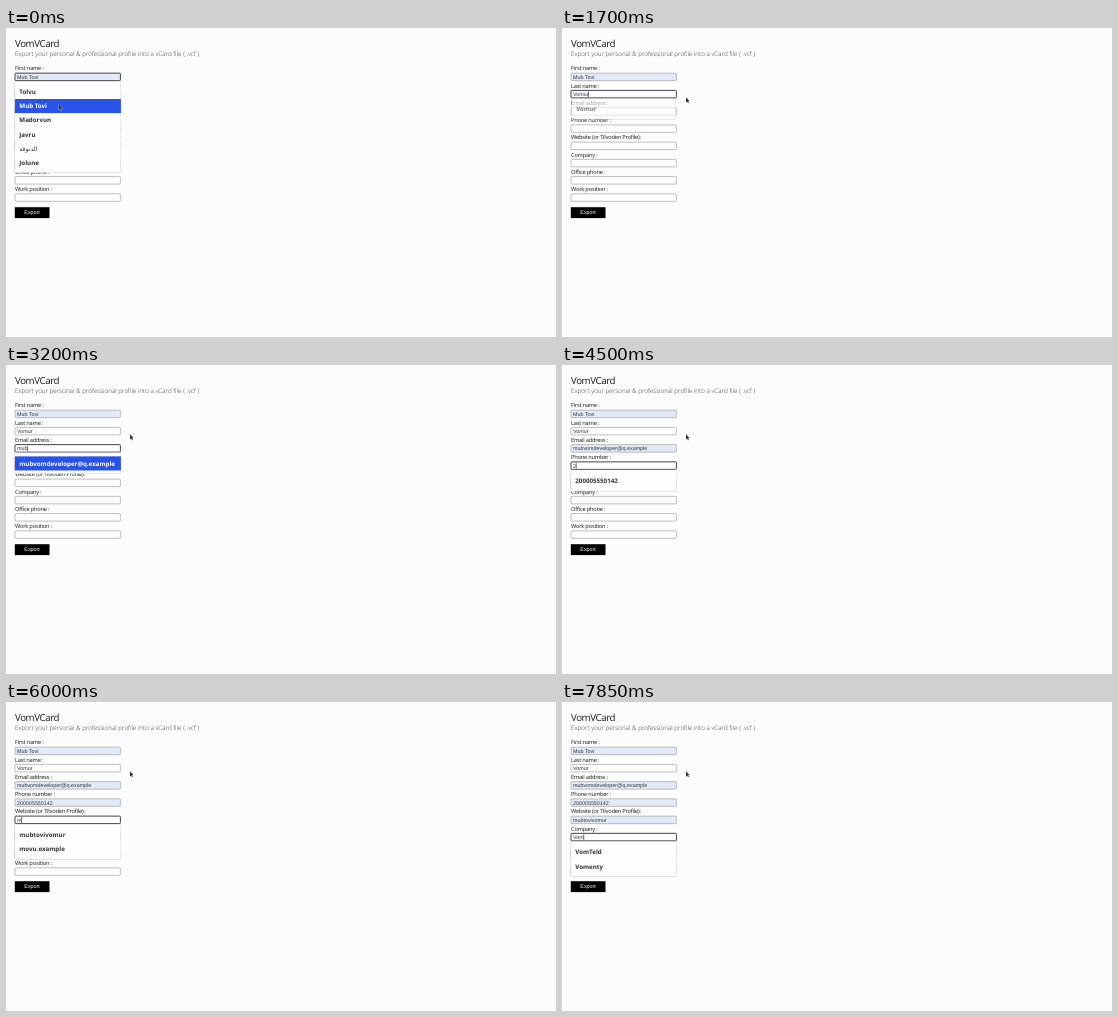
These frames come from a looping animation (550x309 px, 8 s). An HTML page:

```html
<!DOCTYPE html>
<html lang="en">
<head>
<meta charset="utf-8">
<title>Contact form</title>
<style>
  html, body { margin: 0; width: 100%; height: 100%; overflow: hidden; background: #fcfcfc; }
  svg { display: block; width: 100%; height: 100%; }
  text { white-space: pre; text-rendering: geometricPrecision; }
  .title, .label { font-family: "Open Sans", sans-serif; fill: #1a1a1a; }
  .title { font-size: 9.7px; letter-spacing: -.4px; }
  .label { font-size: 5.7px; letter-spacing: -.2px; }
  .subtitle { font: 300 6.3px "Open Sans", sans-serif; fill: #333; }
  .value, .button { font: 5.37px "Liberation Sans", Arial, sans-serif; fill: #333; }
  .button { fill: #fff; text-anchor: middle; }
  .box { fill: #fdfdfd; stroke: #959595; stroke-width: .6px; }
  .box.filled { fill: #e2eaf7; }
  .box.focus { stroke: #303038; stroke-width: .9px; }
  .menu { transform-box: fill-box; transform-origin: center; }
  .panel { fill: #fdfdfd; stroke: #d6d6d6; stroke-width: .4px; filter: drop-shadow(0 .5px .7px #0004); }
  .bar { fill: #2853e6; }
  .row { font: 600 6.2px "Noto Sans", "DejaVu Sans", sans-serif; fill: #333; }
  .row.arabic { font-weight: 400; }
  .row.active { fill: #fff; }
</style>
</head>
<body>
<svg id="stage" viewBox="0 0 550 309"></svg>
<script>
const LOOP = 8000, BLINK = 500, CLOSE = 200, ROW = 14.1;
const stage = document.getElementById('stage');
const fieldY = i => 48.9 + 17.24 * i;

const labels = ['First name :', 'Last name :', 'Email address :', 'Phone number :',
  'Website (or Tilvoden Profile):', 'Company :', 'Office phone :', 'Work position :'];
const firstNames = ['Tolvu', 'Mub Tovi', 'Madorvun', 'Javru', 'الدنوفة', 'Jolune'];
const emails = ['mubvomdeveloper@q.example', 'modavan.r@ulk-m.example', 'm.toudrelo@wi.example',
  'malorvendovett@q.example', 'Muvod.enlosta@q.example', 'modavan.r@ulko.example'];
const phone = '200005550142', site = 'mubtovivomur';

// time, focused field, value, mode (preview hides the caret)
const steps = [
  [0, 0, 'Mub Tovi', 'preview'], [100, 0, 'Mub Tovi', 'filled'],
  [700, 1, ''], [1250, 1, 'V'], [1400, 1, 'Vo'], [1500, 1, 'Vom'], [1600, 1, 'Vomu'], [1700, 1, 'Vomur'],
  [1850, 2, ''], [2050, 2, 'm'], [2200, 2, 'mu'], [2850, 2, 'mub'],
  [3250, 2, emails[0], 'preview'], [3400, 2, emails[0], 'filled'],
  [3600, 3, ''], [4500, 3, '2'], [4700, 3, '20'], [4900, 3, phone, 'preview'], [5050, 3, phone, 'filled'],
  [5500, 4, ''], [6000, 4, 'm'], [6200, 4, 'mu'], [6400, 4, site, 'preview'], [6600, 4, site, 'filled'],
  [6800, 5, ''], [7650, 5, 'V'], [7700, 5, 'Vo'], [7850, 5, 'Vom']
].map(([time, field, value, mode = '']) => ({ time, field, value, mode }));

const menus = [
  { open: 0, close: 50, field: 0, rows: firstNames, pick: 1, pickAt: 0 },
  { open: 1250, close: 1650, field: 1, rows: ['Vomur'] },
  { open: 2050, close: 2200, field: 2, rows: emails },
  { open: 2300, close: 3400, field: 2, rows: [emails[0]], pick: 0, pickAt: 3200 },
  { open: 4500, close: 5050, field: 3, rows: [phone], pick: 0, pickAt: 4850 },
  { open: 6000, close: 6200, field: 4, rows: [site, 'movu.example'] },
  { open: 6250, close: 6600, field: 4, rows: [site], pick: 0, pickAt: 6350 },
  { open: 7650, close: LOOP, field: 5, rows: ['VomTeld', 'Vomenty'] }
];

function add(parent, tag, attrs, content = '') {
  const node = document.createElementNS('http://www.w3.org/2000/svg', tag);
  for (const key in attrs) node.setAttribute(key, attrs[key]);
  node.textContent = content;
  return parent.appendChild(node);
}
const write = (parent, cls, x, y, content) => add(parent, 'text', { class: cls, x, y }, content);
const rect = (parent, cls, x, y, width, height, rx = 0) =>
  add(parent, 'rect', { class: cls, x, y, width, height, rx });

write(stage, 'title', 9, 18.5, 'VomVCard');
write(stage, 'subtitle', 9, 27.8, 'Export your personal & professional profile into a vCard file ( .vcf )');

const fields = labels.map((label, i) => {
  const y = fieldY(i);
  write(stage, 'label', 9, y - 6.5, label);
  return {
    box: rect(stage, 'box', 9, y - 3.75, 105.4, 7.5, .8),
    text: write(stage, 'value', 11, y + 2.1, '')
  };
});
const caret = rect(stage, 'caret', 0, 0, .5, 5.8);

rect(stage, '', 8.8, 179.2, 34.7, 10.9);
write(stage, 'button', 26.1, 186.4, 'Export');

for (const menu of menus) {
  const y = fieldY(menu.field);
  const rowY = i => y + 15 + ROW * i;
  menu.group = add(stage, 'g', { class: 'menu' });
  rect(menu.group, 'panel', 8.9, y + 4.4, 105.9, ROW * menu.rows.length + 6.9, .6);
  if (menu.pickAt !== undefined) menu.bar = rect(menu.group, 'bar', 8.9, rowY(menu.pick) - 7, 106, ROW);
  menu.texts = menu.rows.map((row, i) =>
    write(menu.group, /[\u0600-\u06ff]/.test(row) ? 'row arabic' : 'row', 13.3, rowY(i) + 2.3, row));
}

const pointer = add(stage, 'path', {
  d: 'M0 0V5.2L1.2 4.2 2 6 2.9 5.6 2.1 3.9H3.6Z',
  fill: '#333', stroke: '#fff', 'stroke-width': .5, 'paint-order': 'stroke'
});

function drawFields(t) {
  const past = steps.filter(step => step.time <= t);
  const now = past[past.length - 1];
  fields.forEach(({ box, text }, i) => {
    const last = past.filter(step => step.field === i).pop();
    text.textContent = last ? last.value : '';
    box.classList.toggle('filled', Boolean(last && last.mode));
    box.classList.toggle('focus', i === now.field);
  });
  const visible = now.mode !== 'preview' && Math.floor((t - now.time) / BLINK) % 2 === 0;
  const width = now.value ? fields[now.field].text.getComputedTextLength() : 0;
  caret.setAttribute('x', 10.9 + width);
  caret.setAttribute('y', fieldY(now.field) - 2.8);
  caret.setAttribute('visibility', visible ? 'visible' : 'hidden');
}

function drawMenus(t) {
  for (const menu of menus) {
    const p = Math.min(1, Math.max(0, (t - menu.close) / CLOSE));
    const shown = t >= menu.open && p < 1;
    menu.group.style.display = shown ? '' : 'none';
    menu.group.style.opacity = (1 - p) ** 1.6;
    menu.group.style.transform = `scale(${1 - .08 * p})`;
    if (!menu.bar) continue;
    const active = t >= menu.pickAt;
    menu.bar.style.display = active ? '' : 'none';
    menu.texts[menu.pick].classList.toggle('active', active);
  }
}

function drawPointer(t) {
  const p = Math.min(1, Math.max(0, (t - 120) / 530));
  const eased = p * p * (3 - 2 * p);
  pointer.setAttribute('transform', `translate(${53 + 71 * eased} ${76.6 - 7.4 * eased})`);
}

const start = performance.now();
function frame() {
  const t = (performance.now() - start) % LOOP;
  drawFields(t);
  drawMenus(t);
  drawPointer(t);
  requestAnimationFrame(frame);
}
frame();
</script>
</body>
</html>
```
